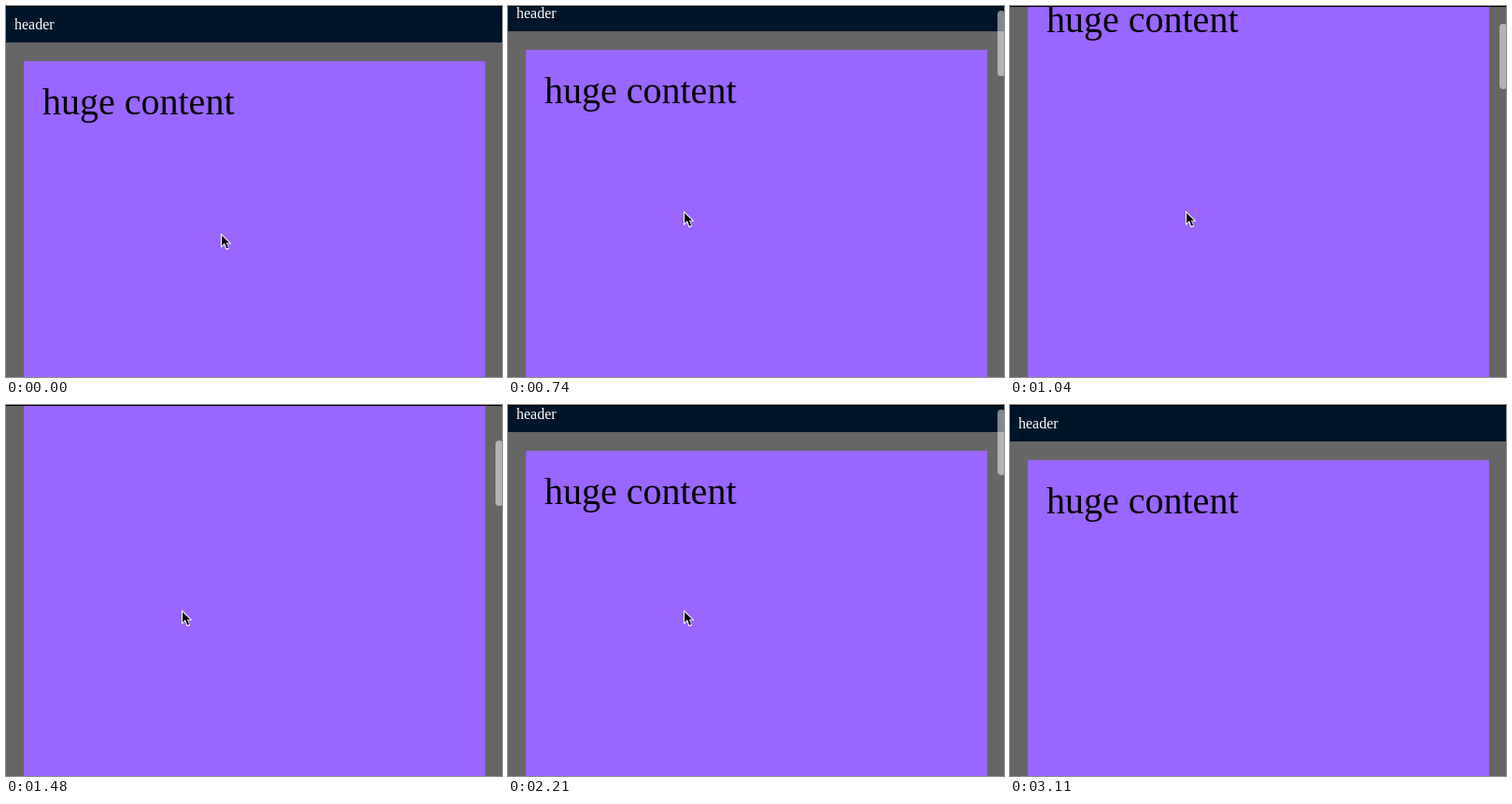
Recreate the animation shown at these times as an HTML page. Size 531 by 397 pixels, loop 3400 ms.

```html
<!DOCTYPE html>
<html lang="en">
<head>
<meta charset="utf-8">
<title>Scrolling page</title>
<style>
  @property --scroll { syntax: "<number>"; inherits: true; initial-value: 0; }

  html, body { margin: 0; width: 100%; height: 100%; overflow: hidden; }

  .stage {
    position: relative;
    width: 531px;
    height: 397px;
    overflow: hidden;
    background: #666;
    font: 16px "Liberation Serif", "Times New Roman", serif;
    animation: scroll 3.4s step-end infinite;
  }

  .page {
    position: absolute;
    top: 1px;
    left: 0;
    width: 100%;
    transform: translateY(calc(var(--scroll) * -1px));
  }
  .header {
    box-sizing: border-box;
    height: 38px;
    padding: 10px 9px;
    line-height: 18px;
    color: #fff;
    background: #001529;
  }
  .content {
    box-sizing: border-box;
    width: 494px;
    height: 2000px;
    margin: 20px 0 0 19px;
    padding: 20px;
    font-size: 40px;
    color: #000;
    background: #96f;
  }

  .edge { position: absolute; top: 0; left: 0; width: 100%; height: 1px; background: #000; }

  .thumb {
    position: absolute;
    top: 3px;
    left: 524px;
    width: 8px;
    height: 70px;
    border-radius: 4px;
    background: rgba(255, 255, 255, .5);
    transform: translateY(calc(var(--scroll) * .181px));
    animation: fade 3.4s step-end infinite;
  }

  .cursor {
    position: absolute;
    top: 0;
    left: 0;
    width: 14px;
    height: 20px;
    overflow: visible;
    filter: drop-shadow(0 .5px .5px rgba(0, 0, 0, .3));
    animation: point 3.4s step-end infinite;
  }

  @keyframes scroll {
    0%     { --scroll: 0; }
    21.76% { --scroll: 12; }
    26.17% { --scroll: 60; }
    30.58% { --scroll: 88; }
    34.99% { --scroll: 144; }
    39.11% { --scroll: 171; }
    43.52% { --scroll: 193; }
    52.05% { --scroll: 177; }
    56.47% { --scroll: 105; }
    60.88% { --scroll: 51; }
    64.99% { --scroll: 10; }
    69.41%, 100% { --scroll: 0; }
  }

  @keyframes fade {
    0%     { opacity: 0; }
    21.76% { opacity: 1; }
    87.05% { opacity: .5; }
    91.47%, 100% { opacity: 0; }
  }

  @keyframes point {
    0%     { transform: translate(230px, 243px); opacity: 1; }
    8.82%  { transform: translate(215px, 234px); opacity: 1; }
    12.94% { transform: translate(188px, 219px); opacity: 1; }
    87.05% { transform: translate(281px, 271px); opacity: 1; }
    91.47%, 100% { transform: translate(281px, 271px); opacity: 0; }
  }
</style>
</head>
<body>
<div class="stage">
  <div class="page">
    <div class="header">header</div>
    <div class="content">huge content</div>
  </div>
  <div class="edge"></div>
  <div class="thumb"></div>
  <svg class="cursor" viewBox="0 0 14 20">
    <path fill="#fff" d="M0 0V16L3.6 12.6 5.6 18.2 9.1 16.7 7 11.6H11.6Z"/>
    <path d="M1 2.4V13.6L4 10.7 6.2 16.6 8 15.8 5.9 10.6H9.2Z"/>
  </svg>
</div>
</body>
</html>
```
